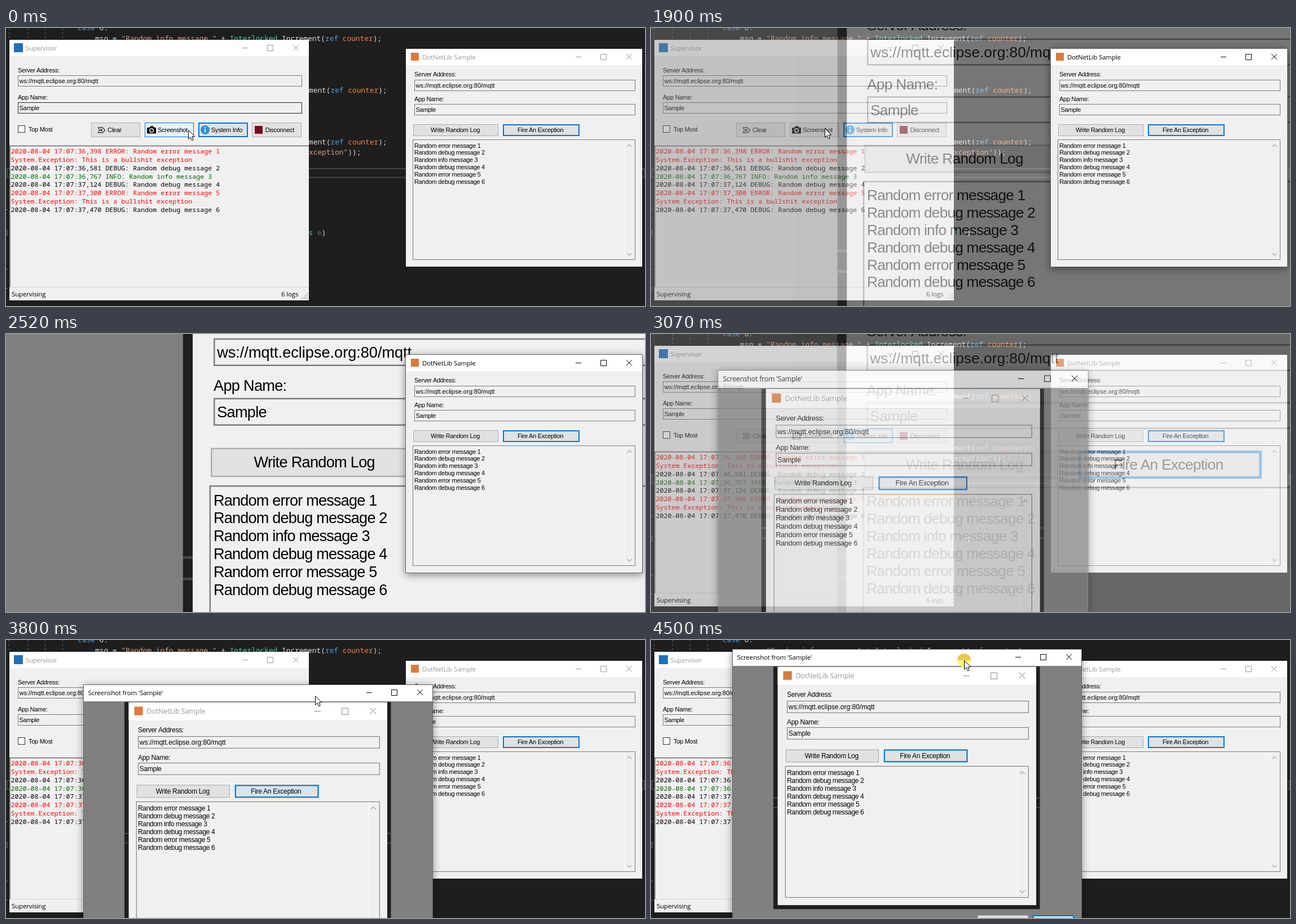
An HTML page that plays this animation: 1133 by 494 pixels, repeating every 4650 ms.

```html
<!DOCTYPE html>
<html lang="en">
<head>
<meta charset="utf-8">
<title>Supervisor</title>
<style>
  html, body { margin: 0; height: 100%; overflow: hidden; background: #1e1e1e; }
  svg { display: block; width: 100vw; height: 100vh; }
  text { white-space: pre; }
  .ui { font: 11px "Liberation Sans", Arial, sans-serif; letter-spacing: -.28px; }
  .list { letter-spacing: -.33px; }
  .addr { letter-spacing: 0; }
  .seg { font: 11.5px "Open Sans", "Noto Sans", sans-serif; letter-spacing: -.15px; }
  .log { font: 11.667px "Noto Sans Mono", monospace; }
  .code { font: 12.83px "Noto Sans Mono", monospace; fill: #dcdcdc; }
  .kw { fill: #569cd6; } .type { fill: #4ec9b0; } .str { fill: #d69d85; }
  .var { fill: #f58245; } .dim { fill: #806a4c; }
  .cap { fill: #999; }
  .ctl { fill: none; stroke: #999; }
  .frame { fill: #f0f0f0; }
  .on .cap { fill: #000; }
  .on .ctl { stroke: #000; }
  .on .frame { stroke: #666; stroke-width: 2; paint-order: stroke; filter: drop-shadow(0 3px 7px rgba(0, 0, 0, .45)); }
  .btn { fill: #e1e1e1; stroke: #adadad; }
  .default { stroke: #0078d7; stroke-width: 2; }
  .hover .btn { fill: #e5f1fb; stroke: #0078d7; }
  .pressed .btn { fill: #cce4f7; stroke: #005499; stroke-width: 2; }
  .disabled .btn { fill: #ccc; stroke: #bfbfbf; }
  .disabled text { fill: #9c9c9c; }
  .disabled .icon { fill: #777; }
  .soft { filter: blur(.3px); }
</style>
</head>
<body>
<svg id="stage" viewBox="0 0 1133 494" xmlns="http://www.w3.org/2000/svg"></svg>
<script>
const LOOP = 4650;
const stage = document.getElementById('stage');

const rect = (x, y, w, h, attrs) =>
  `<rect x="${x}" y="${y}" width="${w}" height="${h}" ${attrs}/>`;
// Outlined box whose stroke stays inside its bounds.
const box = (x, y, w, h, attrs, line = 1) =>
  rect(x + line / 2, y + line / 2, w - line, h - line, attrs);
const text = (x, y, s, cls, attrs = '') =>
  `<text x="${x}" y="${y}" class="${cls}" ${attrs}>${s}</text>`;
const path = (d, attrs) => `<path d="${d}" ${attrs}/>`;
const span = (cls, s) => `<tspan class="${cls}">${s}</tspan>`;

const field = (x, y, w, s, cls = '', id = '') =>
  box(x, y, w, 20, `fill="#f0f0f0" stroke="#7a7a7a" ${id}`) +
  text(x + 2.5, y + 14, s, 'ui ' + cls);
const button = (x, y, w, h, label, tx, cls = '') =>
  box(x, y, w, h, `class="btn ${cls}"`, cls ? 2 : 1) +
  text(tx, y + Math.floor(h / 2) + 4, label, 'ui');
const controls = (x, y) => path(
  `M${x - 5} ${y + .5}h10M${x + 39.5} ${y - 4.5}h10v10h-10z` +
  `M${x + 85} ${y - 5}l10 10m0 -10l-10 10`, 'class="ctl"');
const lineBox = (x, w) =>
  path(`M${x} 250h${w}M${x} 265.5h${w}`, 'stroke="#464646" stroke-width="2"');

function editor() {
  const call = span('kw', 'ref') + ' ' + span('var', 'counter') + ');';
  const guides = [5.5, 38.5, 69.5, 100.5].map(x => `M${x} 0v21`).join('');
  return rect(0, 0, 1133, 494, 'fill="#1e1e1e"') +
    path(guides, 'stroke="#5a5a5a" stroke-dasharray="4 3"') +
    path('M1.5 250v15.5M1132 250v15.5', 'stroke="#464646" stroke-width="2"') +
    lineBox(1, 1131) +
    path('M0 322.5h3M0 428.5h3M0 462.5h3M-6 359.5h8v9h-8', 'fill="none" stroke="#777"') +
    text(127, 4, span('kw', 'case') + ' 6:', 'code') +
    text(158, 22.5, 'msg = ' + span('str', '"Random info message "') + ' + ' +
      span('type', 'Interlocked') + '.Increment(' + call, 'code') +
    text(498.5, 114.5, 'Increment(' + call, 'code') +
    text(498.5, 206.5, 'Increment(' + call, 'code') +
    text(529.3, 225, span('str', 'exception"') + '));', 'code') +
    text(536.5, 368, span('type', 's') + ' ' + span('dim', 'e') + ')', 'code');
}

const kinds = ['error', 'debug', 'info', 'debug', 'error', 'debug'];

function sampleWindow() {
  const list = kinds.map((k, i) =>
    text(724, 212.5 + i * 12.9, `Random ${k} message ${i + 1}`, 'ui list')).join('');
  return rect(709, 37, 419, 387, 'class="frame"') +
    rect(709, 37, 419, 29, 'fill="#fff"') +
    rect(718, 44, 14, 14, 'fill="#dc7a3c"') +
    text(738, 55.5, 'DotNetLib Sample', 'seg cap') + controls(1015, 51) +
    text(724, 86, 'Server Address:', 'ui') +
    field(724, 92, 392, 'ws://mqtt.eclipse.org:80/mqtt', 'addr') +
    text(724, 130, 'App Name:', 'ui') + field(724, 135, 392, 'Sample') +
    button(722, 171, 151, 21, 'Write Random Log', 753) +
    button(881, 171, 136, 21, 'Fire An Exception', 907, 'default') +
    box(721, 198, 395, 214, 'fill="#f0f0f0" stroke="#7a7a7a"') +
    path('M1097.5 199v212', 'stroke="#fafafa"') +
    path('M1101.5 211l4 -4l4 4M1101.5 400l4 4l4 -4',
      'fill="none" stroke="#b5b5b5" stroke-width="1.5"') + list;
}

function logLines() {
  const stamps = ['36,398', '36,581', '36,767', '37,124', '37,300', '37,470'];
  const color = { error: '#f00', debug: '#000', info: '#006400' };
  const rows = [];
  kinds.forEach((k, i) => {
    rows.push([`2020-08-04 17:07:${stamps[i]} ${k.toUpperCase()}: Random ${k} message ${i + 1}`, color[k]]);
    if (k === 'error') rows.push(['System.Exception: This is a bullshit exception', color[k]]);
  });
  return rows.map(([s, c], i) => text(8.5, 223 + i * 14.87, s, 'log', `fill="${c}"`)).join('');
}

function supervisor() {
  const camera = path('M250 177h4l2 -2.5h5l2 2.5h3v10.5h-16z', 'class="icon"') +
    '<circle cx="258" cy="182" r="3.3" fill="none" stroke="#e8e8e8" stroke-width="1.6"/>';
  const grip = [[533, 471], [533, 475], [533, 479], [529, 475], [529, 479], [525, 479]]
    .map(([x, y]) => rect(x, y, 2, 2, 'fill="#a8a8a8"')).join('');
  return rect(6, 21, 531, 463, 'class="frame"') +
    rect(6, 21, 531, 29, 'fill="#fff"') +
    rect(14, 27, 16, 16, 'fill="#1f6fc0"') +
    text(34.5, 39.5, 'Supervisor', 'seg cap') + controls(424, 35) +
    text(21, 79, 'Server Address:', 'ui') +
    field(21, 84, 504, 'ws://mqtt.eclipse.org:80/mqtt', 'addr') +
    text(21, 127, 'App Name:', 'ui') + field(21, 132, 504, 'Sample', '', 'id="nameBox"') +
    box(21, 173, 13, 13, 'fill="#fff" stroke="#333"') + text(40, 184, 'Top Most', 'ui') +
    button(151, 168, 87, 26, 'Clear', 180) +
    path('M163.5 177h8l4 4.5l-4 4.5h-8l2 -4.5z', 'fill="#eee" stroke="#333" stroke-width="1.3"') +
    path('M167 179.5l4 4m0 -4l-4 4', 'stroke="#222" stroke-width="1.5"') +
    '<g id="shot">' + button(246, 168, 87, 26, 'Screenshot', 269) + camera + '</g>' +
    button(341, 168, 88, 26, 'System Info', 364, 'default" id="info') +
    '<circle cx="353" cy="181" r="8" fill="#2b8fd6"/>' +
    path('M353 176v2M353 179.5v6', 'stroke="#fff" stroke-width="2"') +
    button(436, 168, 88, 26, 'Disconnect', 459.5) +
    rect(441, 174, 14, 14, 'fill="#7d0a20"') +
    path('M6 209.5h531M7 209v252', 'stroke="#696969" stroke-width="1.5" fill="none"') +
    path('M7 460.5h529', 'stroke="#d0d0d0"') + logLines() +
    text(10, 477, 'Supervising', 'seg') + text(488, 477, '6 logs', 'seg') + grip;
}

const picture = (x, y, scale) =>
  `<g class="soft" transform="translate(${x} ${y}) scale(${scale}) translate(-724 -82)">` +
  rect(702, 36.5, 432, 394, 'fill="#1e1e1e"') + lineBox(702, 432) + sampleWindow() + '</g>';

const viewer = () =>
  rect(1, 1, 618, 558, 'class="frame"') +
  rect(1, 1, 618, 29, 'fill="#fff"') + rect(1, 30, 618, 529, 'fill="#808080"') +
  text(8.5, 19, "Screenshot from 'Sample'", 'seg cap') + controls(507, 14);

const viewerBody = () => picture(97, 81, 1.094) +
  box(435, 473, 90, 26, 'class="btn"') + box(533, 473, 73, 26, 'class="btn default"', 2);

stage.innerHTML = editor() +
  `<g id="sup">${supervisor()}</g>` +
  `<g>${sampleWindow()}</g>` +
  `<g id="max">${rect(-40, -40, 1300, 620, 'fill="#808080"')}${picture(368, -17, 2.465)}</g>` +
  `<g id="front" class="on">${sampleWindow()}</g>` +
  `<g id="view"><g class="on">${viewer()}</g>${viewerBody()}</g>` +
  '<g id="mouse"><circle id="halo" r="12" fill="#fffb7d"/>' +
  '<path id="dome" d="M-12 0a12 12 0 0 1 24 0z" fill="#ecca52"/>' +
  path('M.5 .5v16l3.7 -3.5l2.5 5.8l2.6 -1.1l-2.5 -5.7h5z', 'fill="#fff" stroke="#000"') + '</g>';

const $ = id => document.getElementById(id);
const show = (id, on) => { $(id).style.display = on ? '' : 'none'; };
const within = (t, a, b) => t >= a && t < b;

// Latest value whose start time has passed.
function at(t, steps) {
  let value = steps[0][1];
  for (const [time, v] of steps) if (t >= time) value = v;
  return value;
}

const mousePath = [
  [0, [323, 181]], [90, [318, 180]], [170, [312, 179]], [250, [308, 178]],
  [2450, [395, 96]], [2520, null],
  [3310, [880, 12]], [3390, [730, 60]], [3470, [625, 92]], [3560, [565, 103]],
  [3630, [560, 98]], [3710, [553, 96]], [3800, [548, 99]]
];
const drag = [
  [0, [137, 79]], [3950, [137, 76]], [4030, [138, 66]], [4100, [139, 51]], [4180, [141, 37]],
  [4260, [142, 28]], [4340, [143, 21]], [4420, [144, 17]], [4500, [144, 16]]
];
const shotState = [[0, 'hover'], [420, 'pressed'], [580, 'disabled'], [1900, '']];
const border = [[0, '#222'], [90, '#444'], [170, '#606060'], [250, '#7a7a7a']];
// opacity and scale
const maxSteps = [[0, [0, 1]], [1900, [.42, .9686]], [1970, [.75, .985]], [2050, [.95, .996]],
  [2130, [1, 1]], [3070, [.35, .97]], [3150, [0, 1]]];
const viewSteps = [[0, [0, 1]], [3070, [.7, 1.06]], [3150, [1, 1.015]], [3230, [1, 1]]];

const zoom = (s, x, y) => `translate(${x} ${y}) scale(${s}) translate(${-x} ${-y})`;

function draw(t) {
  $('sup').setAttribute('class', within(t, 420, 1130) ? 'on' : '');
  $('shot').setAttribute('class', at(t, shotState));
  $('info').setAttribute('class', within(t, 420, 580) ? 'btn' : 'btn default');
  $('nameBox').setAttribute('stroke', at(t, border));
  show('front', within(t, 1130, 2910));

  const [maxAlpha, maxScale] = at(t, maxSteps);
  show('max', maxAlpha);
  $('max').setAttribute('opacity', maxAlpha);
  $('max').setAttribute('transform', zoom(maxScale, 847, 360));

  const [alpha, scale] = at(t, viewSteps);
  const [x, y] = at(t, drag);
  show('view', alpha);
  $('view').setAttribute('opacity', alpha);
  $('view').setAttribute('transform', `translate(${x} ${y}) ${zoom(scale, 310, 250)}`);

  const pos = t >= 3950 ? [x + 411, y + 20] : at(t, mousePath);
  show('mouse', pos);
  if (pos) $('mouse').setAttribute('transform', `translate(${pos})`);
  show('halo', within(t, 420, 580) || t >= 3950);
  show('dome', t >= 4500);
}

let start;
function tick(now) {
  start ??= now;
  draw((now - start) % LOOP);
  requestAnimationFrame(tick);
}
draw(0);
requestAnimationFrame(tick);
</script>
</body>
</html>
```
